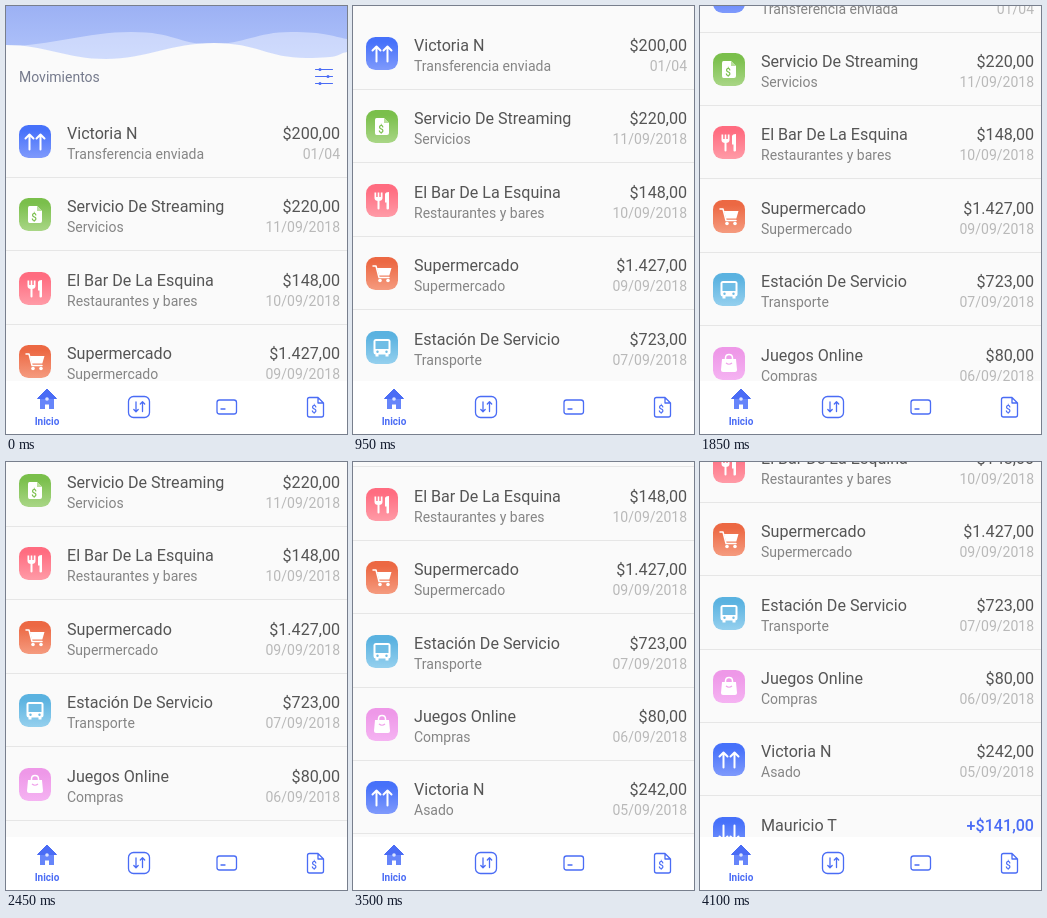
An HTML page that plays this animation: 341 by 428 pixels, repeating every 4.4 s.

```html
<!DOCTYPE html>
<html lang="es">
<head>
<meta charset="utf-8">
<title>Movimientos</title>
<style>
  html, body { margin: 0; height: 100%; overflow: hidden; background: #fafafa; }
  svg { display: block; width: 341px; height: 428px; font: 14px Roboto, sans-serif; }
  .title { font-size: 16.1px; fill: #555; }
  .sub { fill: #858585; }
  .date { fill: #b9b9b9; }
  .income { font-weight: 500; fill: #4a6cf5; }
  .end { text-anchor: end; }
  .line { fill: none; stroke: #4a6cf5; stroke-width: 1.3; stroke-linecap: round; stroke-linejoin: round; }
  .thin { stroke-width: 1.1; }
  .glyph { fill: #fff; }
  .stroke { fill: none; stroke: #fff; stroke-width: 2; stroke-linecap: round; stroke-linejoin: round; }
  .fine { stroke-width: 1.5; }
  .dollar { font-size: 10px; font-weight: 500; text-anchor: middle; }
</style>
</head>
<body>
<svg viewBox="0 0 341 428">
  <defs id="defs">
    <linearGradient id="sky" x2="0" y2="1">
      <stop stop-color="#9cb1f4"/><stop offset="1" stop-color="#b2c5fb"/>
    </linearGradient>
  </defs>
  <rect width="341" height="428" fill="#fafafa"/>
  <g id="header">
    <rect width="341" height="58" fill="url(#sky)"/>
    <path fill="#fff" opacity=".4" d="M0 40C45 40 80 26 125 26S170 38 205 38S250 26 285 26S325 30 341 33V60H0Z"/>
    <path fill="#fafafa" d="M0 39C40 39 60 53 100 53S165 37 208 37S262 52 300 52S330 48 341 46V60H0Z"/>
    <text x="13" y="76" fill="#757a8c">Movimientos</text>
    <path class="line thin" d="M309.500 63.500H326.500M309.500 70.500H326.500M309.500 77.500H326.500"/>
    <g fill="#4a6cf5">
      <circle cx="314" cy="63.500" r="1.500"/><circle cx="322" cy="70.500" r="1.500"/><circle cx="314" cy="77.500" r="1.500"/>
    </g>
  </g>
  <g id="list"></g>
  <g id="nav">
    <rect y="375" width="341" height="53" fill="#fff"/>
    <path fill="#6685fa" d="M34 391H48V403H43V398.500H39V403H34Z"/>
    <path fill="#4a6cf5" stroke="#4a6cf5" stroke-linejoin="round" d="M41 383L50.500 392.500H31.500Z"/>
    <circle cx="41" cy="393" r="1.800" fill="#dbe3ff"/>
    <text x="41" y="419" font-size="10" font-weight="700" text-anchor="middle" fill="#4a6cf5">Inicio</text>
    <g class="line">
      <rect x="122.500" y="390.500" width="21" height="21" rx="5"/>
      <path d="M130 396V405.500M127.800 403.500L130 405.700L132.200 403.500M136.500 405.500V396M134.300 398L136.500 395.800L138.700 398"/>
      <rect x="211" y="394" width="19.500" height="14" rx="2.500"/>
      <path d="M215 403H219"/>
      <path d="M303.500 391.500H312L317.500 397V409Q317.500 411 315.500 411H303.500Q301.500 411 301.500 409V393.500Q301.500 391.500 303.500 391.500ZM312 391.500V397H317.500"/>
    </g>
    <text class="dollar" x="308" y="406.500" fill="#4a6cf5">$</text>
  </g>
</svg>
<script>
const LOOP = 4400, TICK = 150, FIRST = 200, LAST = 4100;
const ROW_TOP = 98, ROW_HEIGHT = 73.4;

const arrows = '<path class="stroke" d="M11 24.500V9.500M7 13.500L11 9.500L15 13.500M22 24.500V9.500M18 13.500L22 9.500L26 13.500"/>';

// Each icon: top colour, bottom colour, drawing on a 33 px tile
const icons = {
  send: ['#4671fa', '#7f9afc', arrows],
  receive: ['#4671fa', '#7f9afc', `<g transform="rotate(180 16.500 16.500)">${arrows}</g>`],
  bill: ['#7abf4b', '#a9d686', `<path class="glyph" d="M11 8H18.500L23.500 13V23Q23.500 25 21.500 25H11Q9.500 25 9.500 23V10Q9.500 8 11 8Z"/>
    <path d="M18.500 8V13H23.500" fill="#b9df9c"/><text class="dollar" x="15.500" y="22.500" fill="#7abf4b">$</text>`],
  food: ['#ff6c80', '#ff9ba7', `<path class="stroke" d="M13 16V24.500"/>
    <path class="glyph" d="M9 8.500H10.700V13H12.200V8.500H13.800V13H15.300V8.500H17V14Q17 17 13 17Q9 17 9 14Z"/>
    <path class="glyph" d="M19.500 10Q20 8 23.500 8V24.500Q23.500 25.500 22.200 25.500T21 24.500V18.500H19.500Z"/>`],
  cart: ['#ec6843', '#f59b7f', `<path class="stroke fine" d="M7.500 9H10.500L13.500 20.500H23.500"/>
    <path class="glyph" d="M11.500 11H26L23.800 18.500H13.500Z"/>
    <circle class="glyph" cx="14.500" cy="23.500" r="1.800"/><circle class="glyph" cx="22.500" cy="23.500" r="1.800"/>`],
  bus: ['#5ab2e0', '#95d0ee', `<rect class="glyph" x="8" y="8" width="17" height="15.500" rx="2.500"/>
    <rect x="10" y="10" width="13" height="8" fill="#6fbde5"/>
    <circle cx="12" cy="20.800" r="1.200" fill="#6fbde5"/><circle cx="21" cy="20.800" r="1.200" fill="#6fbde5"/>
    <path class="glyph" d="M10 23H13V25.500H10ZM20 23H23V25.500H20Z"/>`],
  bag: ['#ee98e8', '#f5b3f2', `<path class="stroke fine" d="M13 13V11Q13 7.500 16.500 7.500T20 11V13"/>
    <path class="glyph" d="M9.500 12H23.500L24.500 23Q24.500 25 22.500 25H10.500Q8.500 25 8.500 23Z"/>
    <path d="M13.500 16Q16.500 18.500 19.500 16" fill="none" stroke="#f0a2ea" stroke-width="1.200"/>`]
};

const rows = [
  ['send', 'Victoria N', 'Transferencia enviada', '$200,00', '01/04'],
  ['bill', 'Servicio De Streaming', 'Servicios', '$220,00', '11/09/2018'],
  ['food', 'El Bar De La Esquina', 'Restaurantes y bares', '$148,00', '10/09/2018'],
  ['cart', 'Supermercado', 'Supermercado', '$1.427,00', '09/09/2018'],
  ['bus', 'Estación De Servicio', 'Transporte', '$723,00', '07/09/2018'],
  ['bag', 'Juegos Online', 'Compras', '$80,00', '06/09/2018'],
  ['send', 'Victoria N', 'Asado', '$242,00', '05/09/2018'],
  ['receive', 'Mauricio T', '', '+$141,00', '']
];

const header = document.getElementById('header');
const list = document.getElementById('list');

document.getElementById('defs').innerHTML += Object.entries(icons).map(([name, [top, bottom]]) =>
  `<linearGradient id="${name}" x2="0" y2="1"><stop offset=".15" stop-color="${top}"/><stop offset="1" stop-color="${bottom}"/></linearGradient>`
).join('');

list.innerHTML = rows.map(([icon, title, sub, amount, date]) => `
  <g>
    <g transform="translate(12.500 21)">
      <rect x=".5" width="32" height="33" rx="9.500" fill="url(#${icon})"/>${icons[icon][2]}
    </g>
    <text class="title" x="61" y="35">${title}</text>
    <text class="sub" x="61" y="55">${sub}</text>
    <text class="title end ${amount[0] === '+' ? 'income' : ''}" x="334" y="35">${amount}</text>
    <text class="date end" x="334" y="55">${date}</text>
    <rect y="73" width="341" height="1" fill="#e6e6e6"/>
  </g>`).join('');

// Scroll distance at given times; the picture advances in ticks
const scrollKeys = [[50, 0], [950, 88], [1850, 145.5], [2450, 180.4], [2900, 204], [3500, 240], [LAST, 278]];

function scrollAt(time) {
  if (time < FIRST) return 0;
  const t = Math.min(LAST, FIRST + Math.floor((time - FIRST) / TICK) * TICK);
  const next = scrollKeys.findIndex(([at]) => at >= t);
  const [t0, y0] = scrollKeys[next - 1], [t1, y1] = scrollKeys[next];
  return y0 + (y1 - y0) * (t - t0) / (t1 - t0);
}

// Snap to whole pixels so text and lines stay crisp
const moveTo = (part, y) => part.setAttribute('transform', `translate(0 ${Math.round(y)})`);

function draw() {
  const scroll = scrollAt(performance.now() % LOOP);
  moveTo(header, -scroll);
  [...list.children].forEach((row, i) => moveTo(row, ROW_TOP + i * ROW_HEIGHT - scroll));
  requestAnimationFrame(draw);
}
draw();
</script>
</body>
</html>
```
